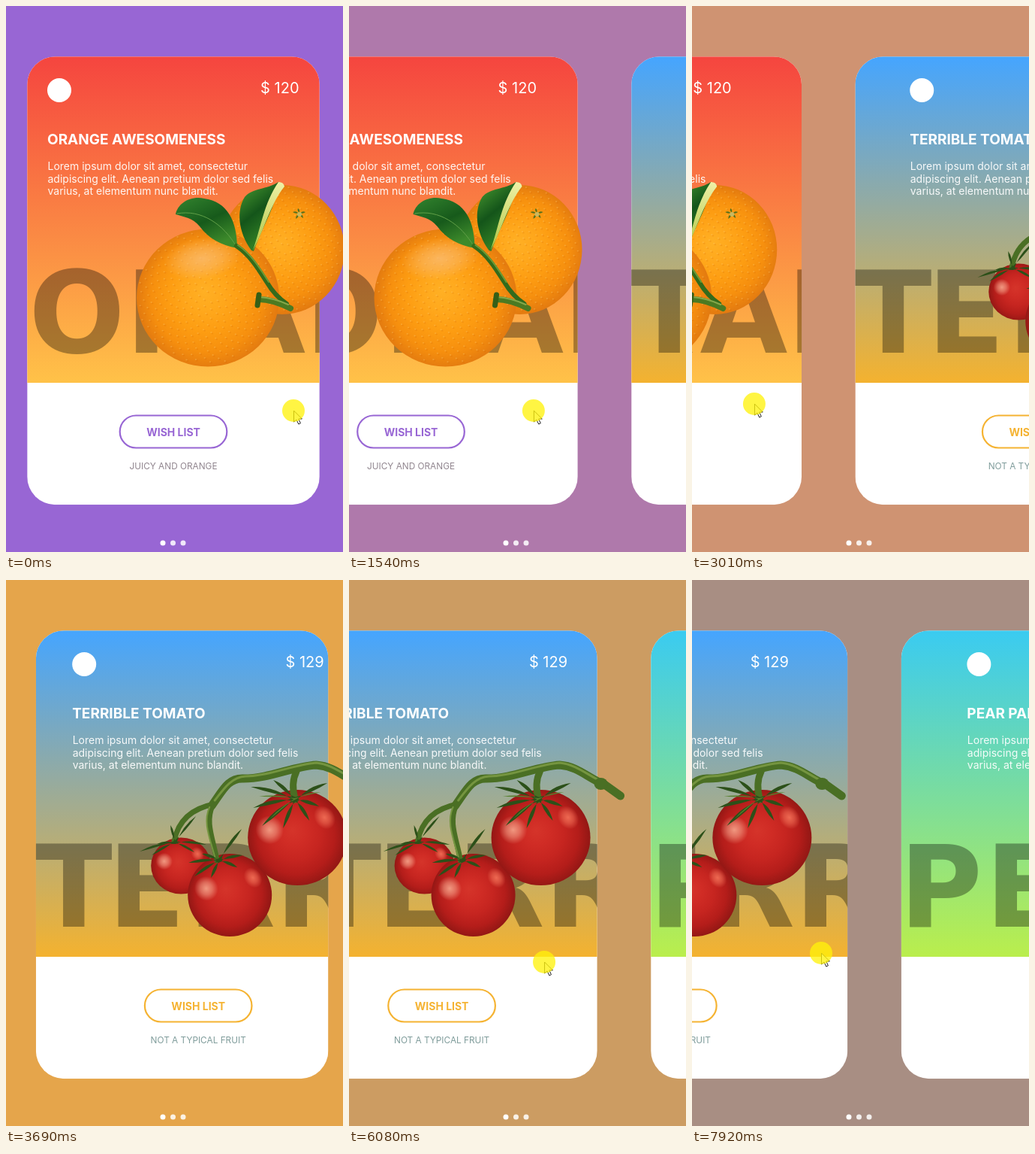
An HTML page with a canvas for the animation above (8 s loop, 449x726 px).

```html
<!DOCTYPE html>
<html lang="en">
<head>
<meta charset="utf-8">
<title>Fruit cards</title>
<style>
  html, body { margin: 0; width: 449px; height: 726px; overflow: hidden; background: #9866d4; }
  canvas { display: block; width: 449px; height: 726px; }
</style>
</head>
<body>
<canvas id="stage"></canvas>
<script>
const W = 449, H = 726, LOOP = 8000;
const PITCH = 461, CONTENT_PITCH = 573;
const CARD = { x: 28.2, y: 67.2, w: 389.6, h: 596, r: 37.5, split: 501 };
const FONT = 'Inter, "Open Sans", sans-serif';
const WIDE_FONT = '"DejaVu Sans", sans-serif';
const canvas = document.getElementById('stage');
const ratio = window.devicePixelRatio || 1;
canvas.width = W * ratio;
canvas.height = H * ratio;
const ctx = canvas.getContext('2d');

const power = k => u => u ** k;
const easeOut = k => u => 1 - (1 - u) ** k;
const mix = (a, b, u) => a + (b - a) * u;

// Keys are [time, value, easing into this key].
function track(keys, t) {
  if (t <= keys[0][0]) return keys[0][1];
  for (let i = 1; i < keys.length; i++) {
    const [t1, v1, ease = u => u] = keys[i], [t0, v0] = keys[i - 1];
    if (t < t1) return mix(v0, v1, ease((t - t0) / (t1 - t0)));
  }
  return keys[keys.length - 1][1];
}

const SCROLL = [[80, 0], [3200, 294, power(1.26)], [4000, 461, easeOut(2.8)], [5450, 461],
  [6690, 644, power(1.1)], [7230, 720, easeOut(1.3)], [7380, 720], [7920, 671.5, power(1.2)]];
const LAG = [[3200, 0], [4000, 22, easeOut(2)], [5450, 22], [6500, 0]];
const CURSOR_X = [[80, 383], [1540, 246, power(1.1)], [3010, 83], [3400, 60], [4610, 112],
  [5230, 374], [5380, 374], [5460, 357], [6690, 165], [7230, 112], [7380, 112], [7920, 172]];
const CURSOR_Y = [[1540, 538], [3010, 529], [4600, 529], [4610, 539], [5380, 539],
  [5460, 517], [6690, 499], [7920, 496]];
const CURSOR_ALPHA = [[3200, 1], [3400, 0], [4600, 0], [4760, 1]];

const cards = [
  { page: [152, 102, 212], top: '#f5453f', bottom: '#ffc248', accent: '#9866d4', note: '#91868f',
    title: 'ORANGE AWESOMENESS', price: '$ 120', caption: 'JUICY AND ORANGE',
    word: [['O', 9], ['R', 144], ['A', 254], ['N', 383]], fruit: drawOranges },
  { page: [229, 165, 75], top: '#45a5ff', bottom: '#f4b22f', accent: '#f5b332', note: '#7f9c9b',
    title: 'TERRIBLE TOMATO', price: '$ 129', caption: 'NOT A TYPICAL FRUIT',
    word: [['T', -1], ['E', 109], ['R', 216], ['R', 332]], fruit: drawTomatoes },
  { page: [120, 124, 175], top: '#3acbf1', bottom: '#baee4c', accent: '#787caf', note: '#8a9a86',
    title: 'PEAR PARADISE', price: '$ 119', caption: 'SWEET AND GREEN',
    word: [['P', 10.5], ['E', 125], ['A', 225], ['R', 358]], fruit: drawPear }
];
const BLURB = ['Lorem ipsum dolor sit amet, consectetur',
  'adipiscing elit. Aenean pretium dolor sed felis', 'varius, at elementum nunc blandit.'];

function text(str, x, y, size, weight, color, align = 'left') {
  ctx.font = `${weight} ${size}px ${FONT}`;
  ctx.fillStyle = color;
  ctx.textAlign = align;
  ctx.fillText(str, x, y);
}

function oval(x, y, rx, ry, fill, angle = 0) {
  ctx.beginPath();
  ctx.ellipse(x, y, rx, ry, angle, 0, Math.PI * 2);
  ctx.fillStyle = fill;
  ctx.fill();
}

function shape(path, fill) {
  ctx.fillStyle = fill;
  ctx.fill(new Path2D(path));
}

function stroke(path, color, width) {
  ctx.strokeStyle = color;
  ctx.lineWidth = width;
  ctx.lineCap = ctx.lineJoin = 'round';
  ctx.stroke(new Path2D(path));
}

function linear(x0, y0, x1, y1, ...colors) {
  const g = ctx.createLinearGradient(x0, y0, x1, y1);
  colors.forEach((c, i) => g.addColorStop(i / (colors.length - 1), c));
  return g;
}

// Shaded round body, lit from (lx, ly) in units of its radii.
function ball(x, y, rx, ry, lx, ly, colors) {
  const g = ctx.createRadialGradient(x + lx * rx, y + ly * ry, 0, x, y, Math.max(rx, ry) * 1.04);
  colors.forEach((c, i) => g.addColorStop(i / (colors.length - 1), c));
  oval(x, y, rx, ry, g);
}

function glow(x, y, rx, ry, color, angle = 0) {
  ctx.save();
  ctx.translate(x, y);
  ctx.rotate(angle);
  ctx.scale(rx, ry);
  const g = ctx.createRadialGradient(0, 0, 0, 0, 0, 1);
  g.addColorStop(0, `rgba(${color},.75)`);
  g.addColorStop(.5, `rgba(${color},.45)`);
  g.addColorStop(1, `rgba(${color},0)`);
  oval(0, 0, 1, 1, g);
  ctx.restore();
}

function orange(x, y, rx, ry) {
  ball(x, y, rx, ry, -.05, -.1, ['#ffb024', '#ffa81c', '#fd9d12', '#f68f0e', '#df7610']);
  for (let i = 1; i < 300; i++) {
    const r = Math.sqrt(i / 300) * .97, a = i * 2.39996;
    const px = x + Math.cos(a) * r * rx, py = y + Math.sin(a) * r * ry;
    oval(px, py, 1.3, 1, 'rgba(205,95,0,.2)');
    oval(px - 1.5, py - 1.5, 1.2, .9, 'rgba(255,210,120,.3)');
  }
}

function drawOranges() {
  orange(368, 324, 83, 86);
  spikes(391, 276, [[382, 274], [386, 283], [399, 274], [396, 282], [389, 269]], 3, '#55701c');
  oval(391, 277, 3, 3, '#c9b860');
  orange(269, 388, 95, 91.5);
  glow(262, 336, 52, 28, '250,190,120', -.15);
  shape('M226 277C229 262 246 252 264 256C295 260 308 286 308 322C286 318 270 309 258 293C248 281 238 281 226 277Z',
    linear(250, 255, 280, 318, '#2c7a2a', '#175a1b', '#3d8a2b'));
  stroke('M228 276C260 270 290 290 307 320', '#62a048', 1);
  shape('M327 325C309 300 307 272 318 254C328 242 348 244 363 234C362 262 342 292 330 326Z',
    linear(312, 250, 352, 300, '#3d8a2b', '#14551a', '#2f7c24'));
  shape('M363 234Q370 234 371 240C353 262 345 295 329 325C341 290 343 264 363 234Z',
    linear(368, 236, 335, 310, '#eef0a6', '#b9cd52'));
  stroke('M307 319C325 331 336 349 348 368Q358 385 374 396', '#336b1c', 6);
  stroke('M309 318C327 330 339 350 350 367', '#6b9a36', 2);
  stroke('M337 390Q355 390 379 402', '#4b7a22', 8);
  stroke('M338 387Q356 388 376 397', '#86a84a', 2);
  stroke('M337 384L335 398', '#355f17', 7);
}

// Tapered sepals fanning out from one point.
function spikes(x, y, tips, width, color) {
  for (const [tx, ty] of tips) {
    const d = Math.hypot(tx - x, ty - y), nx = (y - ty) / d * width, ny = (tx - x) / d * width;
    const mx = mix(x, tx, .45), my = mix(y, ty, .45) - d * .08;
    shape(`M${x - nx / 2} ${y - ny / 2}Q${mx + nx} ${my + ny} ${tx} ${ty}Q${mx - nx} ${my - ny} ${x + nx / 2} ${y + ny / 2}Z`, color);
  }
}

function tomato(x, y, rx, ry) {
  ball(x, y, rx, ry, -.1, -.15, ['#d5342a', '#d02c25', '#c62520', '#b41d1a', '#8c1613']);
  glow(x - rx * .56, y - ry * .16, rx * .28, ry * .3, '255,190,160', -.5);
  glow(x + rx * .55, y - ry * .42, rx * .2, ry * .26, '255,130,100', -.6);
}

function drawTomatoes() {
  ctx.translate(-22, 0);
  tomato(222, 380, 40, 37.5);
  tomato(287, 419, 56, 55);
  tomato(377, 342.5, 66, 63.5);
  const stem = '#4a6f24', dark = '#2c5019', light = '#759540';
  stroke('M266 298C240 303 219 316 213 347', stem, 7);
  stroke('M264 300C254 322 264 342 270 373', stem, 7);
  stroke('M376 254Q368 270 374 292', stem, 9);
  stroke('M263 300C278 279 285 263 305 264C340 264 370 248 402 246C428 248 440 264 462 272L483 287', stem, 11);
  stroke('M267 293C280 276 290 262 308 261C342 260 370 246 402 243C424 245 440 260 460 269', light, 3);
  stroke('M260 302C251 322 260 342 267 368', light, 2);
  oval(457, 271, 9, 8, stem);
  spikes(214, 349, [[167, 361], [183, 366], [190, 351], [242, 314], [256, 352], [240, 362], [208, 326]], 4, dark);
  spikes(273, 373, [[232, 376], [240, 394], [262, 396], [304, 366], [303, 331], [297, 382], [250, 364]], 5, dark);
  spikes(374, 292, [[315, 275], [318, 303], [330, 327], [358, 330], [393, 320], [406, 301], [417, 270], [345, 266]], 6, dark);
  spikes(374, 291, [[326, 288], [340, 318], [408, 282]], 2, '#547f2c');
}

function drawPear() {
  const skin = ctx.createRadialGradient(228, 385, 5, 255, 385, 125);
  skin.addColorStop(0, '#dbe86a');
  skin.addColorStop(.6, '#a9c936');
  skin.addColorStop(1, '#71981f');
  stroke('M300 268Q304 248 318 238', '#6b4a23', 7);
  shape('M300 262C325 264 334 290 335 320C338 350 354 370 350 410C345 460 306 490 258 490C204 490 161 460 162 415C163 372 210 352 240 322C262 300 272 262 300 262Z', skin);
  shape('M306 258C320 230 356 226 380 240C364 264 330 272 306 258Z', linear(310, 240, 375, 255, '#2c7a2a', '#5a9c34'));
}

function drawCard(card, x) {
  const { y, w, h, r, split } = CARD;
  ctx.save();
  ctx.beginPath();
  ctx.roundRect(x, y, w, h, r);
  ctx.clip();
  ctx.fillStyle = '#fff';
  ctx.fillRect(x, y, w, h);
  ctx.fillStyle = linear(0, y, 0, split, card.top, card.bottom);
  ctx.fillRect(x, y, w, split - y);
  ctx.font = `bold 151px ${WIDE_FONT}`;
  ctx.textAlign = 'left';
  ctx.fillStyle = 'rgba(0,0,0,.34)';
  for (const [letter, left] of card.word) {
    const bearing = ctx.measureText(letter).actualBoundingBoxLeft;
    ctx.fillText(letter, x + left + bearing, 460.5);
  }
  ctx.restore();
}

function drawContent(card, x) {
  ctx.save();
  ctx.translate(x, 0);
  oval(71, 112, 16, 16, '#fff');
  text(card.price, 390.5, 115.5, 20, 400, '#fff', 'right');
  text(card.title, 55, 183.5, 19, 700, '#fff');
  BLURB.forEach((line, i) => text(line, 55.5, 218 + i * 16.5, 14, 400, 'rgba(255,255,255,.93)'));
  ctx.beginPath();
  ctx.roundRect(151.7, 544.5, 142.6, 43, 21.5);
  ctx.strokeStyle = card.accent;
  ctx.lineWidth = 2.2;
  ctx.stroke();
  text('WISH LIST', 223, 571.5, 14, 700, card.accent, 'center');
  text(card.caption, 223, 616, 11.8, 400, card.note, 'center');
  card.fruit();
  ctx.restore();
}

function drawCursor(x, y, alpha) {
  if (!alpha) return;
  ctx.save();
  ctx.globalAlpha = alpha;
  ctx.translate(x, y);
  const arrow = 'M.5 .5V15L4 12L6.8 18L9.4 16.8L6.8 11H11Z';
  shape(arrow, '#fff');
  stroke(arrow, '#222', 1);
  oval(0, 0, 15, 15, 'rgba(255,242,10,.77)');
  ctx.restore();
}

function pageColor(scroll) {
  const i = scroll < PITCH ? 0 : 1;
  const u = Math.min(1, (scroll - i * PITCH) / 378);
  return `rgb(${cards[i].page.map((c, k) => Math.round(mix(c, cards[i + 1].page[k], u)))})`;
}

function frame() {
  const t = performance.now() % LOOP;
  const scroll = track(SCROLL, t);
  const shift = scroll * CONTENT_PITCH / PITCH - track(LAG, t);
  ctx.setTransform(ratio, 0, 0, ratio, 0, 0);
  ctx.fillStyle = pageColor(scroll);
  ctx.fillRect(0, 0, W, H);
  cards.forEach((card, i) => drawCard(card, CARD.x + i * PITCH - scroll));
  cards.forEach((card, i) => {
    const x = i * CONTENT_PITCH - shift;
    if (Math.abs(x) < 500) drawContent(card, x);
  });
  [209, 222.5, 236].forEach((x, i) => oval(x, 714, 3.5, 3.5, i ? 'rgba(255,255,255,.85)' : '#fff'));
  drawCursor(track(CURSOR_X, t), track(CURSOR_Y, t), track(CURSOR_ALPHA, t));
  requestAnimationFrame(frame);
}
frame();
</script>
</body>
</html>
```
